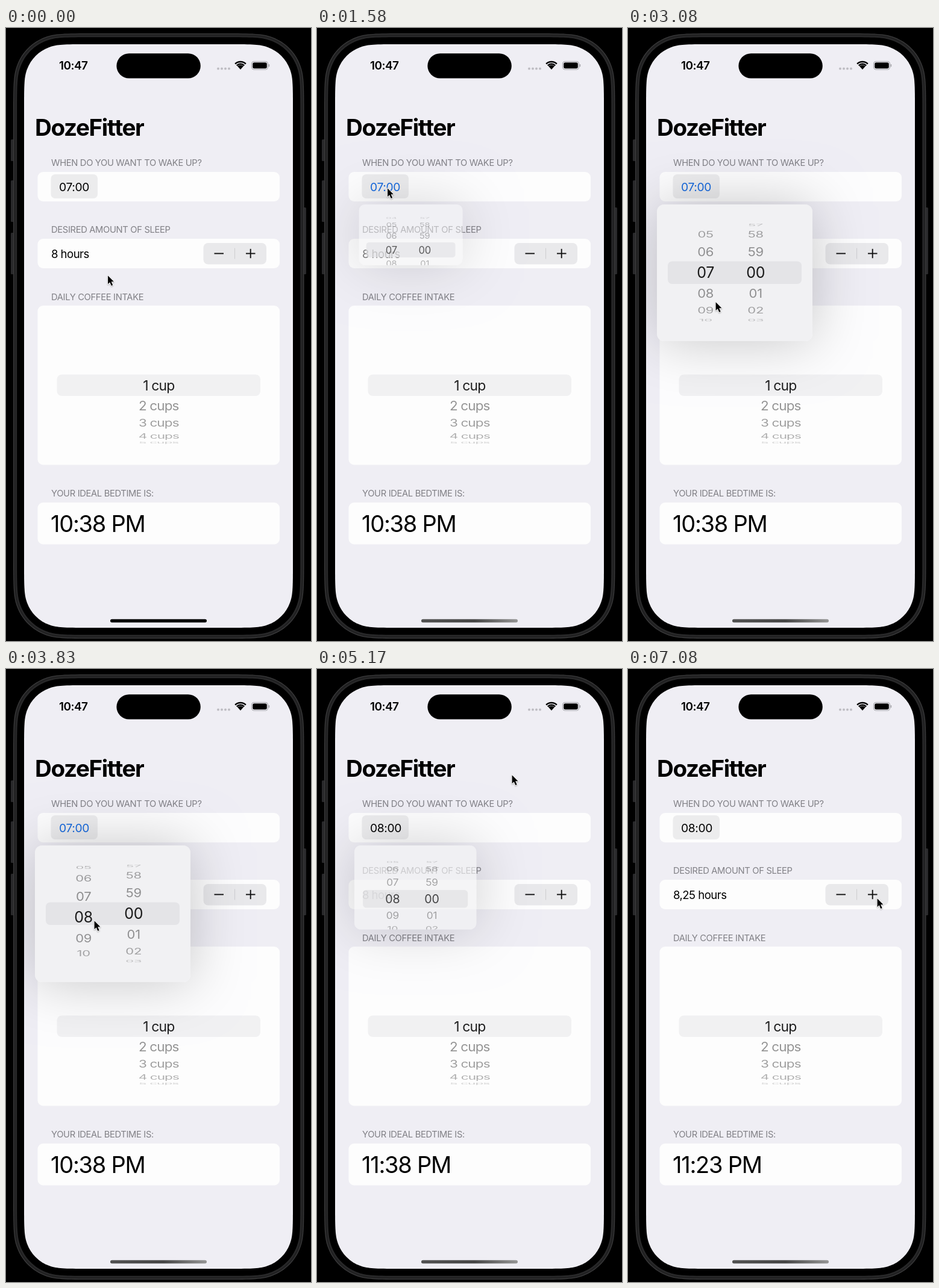
These frames come from a looping animation (506x1018 px, 8000 ms). An HTML page with a canvas:

```html
<!DOCTYPE html>
<html lang="en">
<head>
<meta charset="utf-8">
<title>Sleep calculator</title>
<style>
html, body { margin: 0; width: 100%; height: 100%; overflow: hidden; background: #000; }
canvas { display: block; width: 506px; height: 1018px; }
</style>
</head>
<body>
<canvas id="stage"></canvas>
<script>
const W = 506, H = 1018, LOOP = 8000, FPS = 12;
const FONT = 'Inter, "Liberation Sans", sans-serif';
const canvas = document.getElementById('stage');
const ctx = canvas.getContext('2d');
const dpr = window.devicePixelRatio || 1;
canvas.width = W * dpr;
canvas.height = H * dpr;

// Pointer positions: seconds, x, y
const POINTER = [
  [0, 168.5, 410], [0.5, 168.5, 410], [1.33, 116.5, 265], [1.6, 116.5, 265],
  [2, 126.5, 273], [2.17, 127, 274], [3, 145, 454], [3.09, 145, 454],
  [3.5, 145, 420], [3.67, 145, 420], [3.83, 146, 417], [4, 147, 412],
  [4.42, 284, 202], [4.75, 323, 175], [5.84, 323, 175], [6.42, 413, 380], [8, 413, 380]
];

const clamp = v => Math.min(1, Math.max(0, v));
const ramp = (t, from, to) => clamp((t - from) / (to - from));
const smooth = u => u * u * (3 - 2 * u);
const settle = (t, rate) => t <= 0 ? 0 : 1 - (1 + rate * t) * Math.exp(-rate * t);

function shape(x, y, w, h, r) {
  ctx.beginPath();
  ctx.roundRect(x, y, w, h, r);
}

function box(x, y, w, h, r, fill) {
  shape(x, y, w, h, r);
  ctx.fillStyle = fill;
  ctx.fill();
}

// Corner that eases into its straight sides, unlike a plain arc
function softRect(x, y, w, h, r) {
  const a = 1.5 * r, b = 0.63 * r, c = 0.075 * r, d = 0.373 * r, e = 0.169 * r, f = 0.93 * r;
  const path = new Path2D();
  const corner = (px, py, sx, sy, flip) => {
    const p = (u, v) => flip ? [px + sx * v, py + sy * u] : [px + sx * u, py + sy * v];
    path.lineTo(...p(a, 0));
    path.bezierCurveTo(...p(f, 0), ...p(0.8 * r, 0.013 * r), ...p(b, c));
    path.bezierCurveTo(...p(d, e), ...p(e, d), ...p(c, b));
    path.bezierCurveTo(...p(0.013 * r, 0.8 * r), ...p(0, f), ...p(0, a));
  };
  corner(x, y, 1, 1, true);
  corner(x + w, y, -1, 1, false);
  corner(x + w, y + h, -1, -1, true);
  corner(x, y + h, 1, -1, false);
  path.closePath();
  return path;
}

const SCREEN = softRect(30, 27, 446, 969, 66);

function text(str, x, y, size, color, { weight = 400, track = 0, align = 'left' } = {}) {
  ctx.font = `${weight} ${size}px ${FONT}`;
  ctx.letterSpacing = `${track * size}px`;
  ctx.textAlign = align;
  ctx.textBaseline = 'alphabetic';
  ctx.fillStyle = color;
  ctx.fillText(str, x, y);
}

function line(x1, y1, x2, y2, color, width) {
  ctx.beginPath();
  ctx.moveTo(x1, y1);
  ctx.lineTo(x2, y2);
  ctx.strokeStyle = color;
  ctx.lineWidth = width;
  ctx.stroke();
}

function drawPhone() {
  for (const [y, h] of [[185, 36], [253, 69], [340, 69]]) box(8, y, 5, h, 1.5, '#29292b');
  box(493, 298, 5, 111, 1.5, '#29292b');
  for (const [inset, color] of [[0, '#3a3a3b'], [1.3, '#202021'], [4, '#29292a'], [6.2, '#000']]) {
    ctx.fillStyle = color;
    ctx.fill(softRect(12 + inset, 9 + inset, 482.5 - 2 * inset, 1005 - 2 * inset, 84 - inset));
  }
  ctx.fillStyle = '#efeef4';
  ctx.fill(SCREEN);
}

function drawStatus() {
  text('10:47', 88, 69, 19, '#000', { weight: 600, track: -0.03 });
  box(183.4, 42.2, 139.4, 41.4, 20.7, '#000');
  for (let i = 0; i < 4; i++) box(350 + i * 6, 65.5, 4, 4, 2, '#bebdc3');

  for (const r of [4.8, 8.7, 12.5]) {
    ctx.beginPath();
    ctx.arc(389, 68.5, r, -Math.PI * 0.75, -Math.PI * 0.25);
    ctx.strokeStyle = '#000';
    ctx.lineWidth = r < 5 ? 4.6 : 2.5;
    ctx.stroke();
  }
  ctx.beginPath();
  ctx.moveTo(389, 69);
  ctx.lineTo(386, 65.5);
  ctx.lineTo(392, 65.5);
  ctx.fillStyle = '#000';
  ctx.fill();

  shape(407.5, 55.5, 27, 13.5, 4.3);
  ctx.strokeStyle = '#a2a2a7';
  ctx.lineWidth = 1.1;
  ctx.stroke();
  box(409.2, 57.2, 23.6, 10.1, 2.8, '#000');
  box(435.7, 60, 1.5, 4.6, 0.8, '#a2a2a7');
}

// Rows lie on a cylinder, seen from the front.
function drawWheel({ x, y, radius, step, pos, count, label, big, small, track }) {
  for (let i = Math.ceil(pos - count); i <= pos + count; i++) {
    const str = label(i);
    const angle = (i - pos) * step;
    const depth = Math.cos(angle);
    if (!str || depth < 0.1) continue;
    const chosen = Math.abs(i - pos) < 0.5;
    ctx.save();
    ctx.translate(x, y + radius * Math.sin(angle));
    ctx.scale(1, depth);
    const alpha = chosen ? 0.88 : 0.43 * Math.sqrt(depth);
    const size = chosen ? big : small;
    text(str, 0, size * 0.364, size, `rgba(0,0,0,${alpha})`, { track, align: 'center' });
    ctx.restore();
  }
}

function drawForm(t) {
  text('DozeFitter', 48, 179, 38.6, '#000', { weight: 700, track: -0.036 });

  const header = (str, y) => text(str, 75, y, 14.75, '#818086', { track: -0.024 });
  header('WHEN DO YOU WANT TO WAKE UP?', 228.8);
  header('DESIRED AMOUNT OF SLEEP', 340);
  header('DAILY COFFEE INTAKE', 451.5);
  header('YOUR IDEAL BEDTIME IS:', 777.8);

  for (const [y, h] of [[239, 49], [350, 49], [461, 264.5], [788, 69.5]]) box(52.5, y, 401.5, h, 9, '#fdfdfd');

  const picking = t > 1.49 && t < 5.1;
  box(74.5, 243, 77.5, 40, 7, '#ececed');
  text(t < 4.16 ? '07:00' : '08:00', 88, 270.5, 19.3, picking ? '#1468dd' : '#000', { track: -0.02 });

  text(t < 6.9 ? '8 hours' : '8,25 hours', 75, 382, 18.6, '#000', { track: -0.03 });
  box(327.5, 357, 104.5, 35.5, 8, '#e9e9eb');
  if (t > 6.82 && t < 6.99) box(380, 357, 52, 35.5, [0, 8, 8, 0], '#dcdcde');
  line(379.5, 365.5, 379.5, 383.5, '#cfcfd2', 1.2);
  line(345.5, 374.5, 361, 374.5, '#111', 1.9);
  line(398, 374.5, 413.5, 374.5, '#111', 1.9);
  line(405.7, 366.8, 405.7, 382.2, '#111', 1.9);

  box(84.5, 575.5, 337.5, 35.5, 8, '#f1f1f2');
  drawWheel({
    x: 253.3, y: 594, radius: 96.5, step: Math.PI / 9, pos: 1, count: 4,
    label: n => n < 1 ? '' : n === 1 ? '1 cup' : `${n} cups`,
    big: 23, small: 22.5, track: -0.04
  });

  const bedtime = t < 4.16 ? '10:38 PM' : t < 6.9 ? '11:38 PM' : '11:23 PM';
  text(bedtime, 74, 836.5, 38, '#000', { track: -0.033 });
}

function drawHomeBar(t) {
  const shade = ramp(t, 0.05, 0.42);
  const gray = v => `rgb(${v * shade},${v * shade},${v * shade})`;
  const fill = ctx.createLinearGradient(173, 0, 333, 0);
  fill.addColorStop(0, gray(82));
  fill.addColorStop(0.55, gray(70));
  fill.addColorStop(1, gray(150));
  box(173, 981.8, 160, 5.4, 2.7, fill);
}

function hourAt(t) {
  const drag = 0.8 * smooth(ramp(t, 3.08, 3.5));
  return 7 + drag + 0.03 * ramp(t, 3.67, 3.83) + 0.17 * smooth(ramp(t, 3.84, 4.1));
}

function drawPopover(t) {
  const open = t < 5 ? settle(t - 1.45, 16) : 1 - settle(t - 5.1, 14);
  if (open < 0.015) return;
  const scale = 0.1 + 0.9 * open;
  const alpha = Math.pow(open, 1.5);
  const left = 113 - 65 * scale, width = 258 * scale;
  const height = 227 * scale * scale, radius = 12 * Math.sqrt(scale);

  ctx.save();
  ctx.clip(SCREEN);

  // Shadow only outside the panel
  ctx.save();
  shape(0, 0, W, H, 0);
  ctx.roundRect(left, 293, width, height, radius);
  ctx.clip('evenodd');
  ctx.globalAlpha = Math.sqrt(alpha);
  ctx.shadowColor = 'rgba(0,0,10,0.22)';
  ctx.shadowBlur = 92 * dpr;
  ctx.shadowOffsetX = 2000 * dpr;
  box(left - 2000, 293, width, height, radius, '#000');
  ctx.restore();

  ctx.globalAlpha = alpha;
  box(left, 293, width, height, radius, '#f1f1f3');
  ctx.clip();
  ctx.globalAlpha = Math.sqrt(alpha);
  ctx.translate(113, 293);
  ctx.scale(scale, scale);
  ctx.translate(-113, -293);
  box(66, 387.5, 222, 37.5, 7, '#e4e4e7');

  const two = n => String((n + 60) % 60).padStart(2, '0');
  const wheel = { y: 406.3, radius: 81, step: 0.445, count: 3, label: two, big: 25, small: 22, track: -0.01 };
  drawWheel({ ...wheel, x: 128.7, pos: hourAt(t) });
  drawWheel({ ...wheel, x: 211.8, pos: 0 });
  ctx.restore();
}

function drawPointer(t) {
  const i = Math.max(1, POINTER.findIndex(p => p[0] >= t));
  const [t0, x0, y0] = POINTER[i - 1], [t1, x1, y1] = POINTER[i];
  const u = smooth(ramp(t, t0, t1));
  ctx.save();
  ctx.translate(x0 + (x1 - x0) * u + 0.6, y0 + (y1 - y0) * u + 1.2);
  ctx.scale(0.9, 0.9);
  const arrow = new Path2D('M0 0V15.6L3.5 12.3L6.3 18.8L9 17.6L6.2 11.3H11Z');
  ctx.shadowColor = 'rgba(0,0,0,0.3)';
  ctx.shadowBlur = 2 * dpr;
  ctx.shadowOffsetY = dpr;
  ctx.lineJoin = 'round';
  ctx.lineWidth = 2;
  ctx.strokeStyle = '#fff';
  ctx.stroke(arrow);
  ctx.shadowColor = 'transparent';
  ctx.fillStyle = '#000';
  ctx.fill(arrow);
  ctx.restore();
}

function draw(ms) {
  const t = Math.floor((ms + 5) * FPS / 1000) / FPS;
  ctx.setTransform(dpr, 0, 0, dpr, 0, 0);
  ctx.fillStyle = '#000';
  ctx.fillRect(0, 0, W, H);
  drawPhone();
  drawStatus();
  drawForm(t);
  drawHomeBar(t);
  drawPopover(t);
  drawPointer(t);
}

const start = performance.now();
function tick() {
  draw((performance.now() - start) % LOOP);
  requestAnimationFrame(tick);
}
tick();
</script>
</body>
</html>
```
